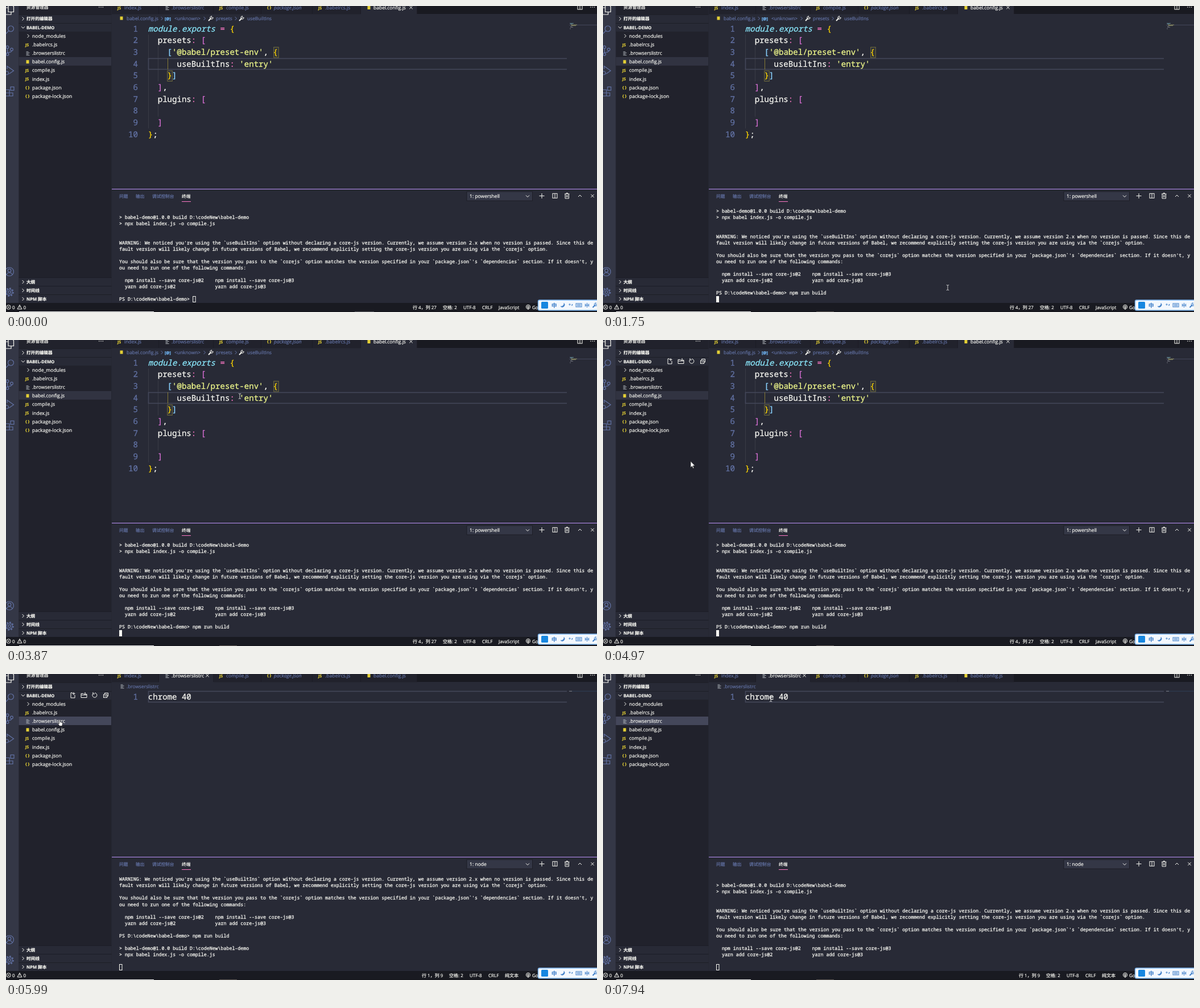
Animation of 1039 by 539 pixels, one loop 8 s. Source, as an HTML page:

```html
<!DOCTYPE html>
<html lang="zh">
<head>
<meta charset="utf-8">
<title>Code editor</title>
<style>
html, body { margin: 0; width: 100%; height: 100%; overflow: hidden; background: #282a36; }
svg { display: block; width: 100vw; height: 100vh; }
text { white-space: pre; text-rendering: geometricPrecision; stroke-width: .2px; font-family: "Open Sans", "Noto Sans CJK SC", "Noto Sans CJK", sans-serif; }
.mono { font-family: "Noto Sans Mono", monospace; stroke-width: .28px; }
</style>
</head>
<body>
<svg id="stage" viewBox="0 0 1039 539"></svg>
<script>
const LOOP = 8000;
const FG = '#f8f8f2', DIM = '#6272a4', BG = '#282a36', SIDE = '#21222c', DARK = '#191a21',
  LINE = '#44475a', PINK = '#ff79c6', JS = '#e3cf35', SOFT = '#313341';
const INK = { w: FG, c: '#8be9fd', p: PINK, y: '#f1fa8c', g: '#ffd700', o: '#da70d6', b: '#87cefa' };

// [time, x, y]
const PATH = [[70, 630, 548], [400, 618, 520], [750, 606, 496], [2460, 606, 496], [2700, 395, 195],
  [2930, 395, 195], [3150, 379, 130], [3400, 400, 76], [3700, 458, 92], [3780, 443, 101],
  [3870, 411, 99], [4260, 411, 98], [4600, 300, 185], [4850, 190, 224], [5050, 130, 215],
  [5260, 90, 120], [5370, 94, 66], [5460, 95, 86], [6080, 95, 86], [6530, 362, 62],
  [6900, 325, 55], [7390, 302, 42], [7460, 302, 42], [7650, 295, 44]];

const TREE = [['node_modules', 'dir'], ['.babelrcs.js', 'js'], ['.browserslistrc', 'txt'],
  ['babel.config.js', 'cfg'], ['compile.js', 'js'], ['index.js', 'js'],
  ['package.json', 'json'], ['package-lock.json', 'json']];

// [left edge, name, icon]
const TABS = [[186, 'index.js', 'js'], [269, '.browserslistrc', 'txt'], [365, 'compile.js', 'js'],
  [449, 'package.json', 'json'], [539, '.babelrcs.js', 'js'], [624, 'babel.config.js', 'cfg'], [723]];

// ink key and text alternate
const CONFIG = [
  ['c', 'module.exports', 'p', ' = ', 'g', '{'],
  ['w', '  presets', 'p', ': ', 'o', '['],
  ['b', '    [', 'y', "'@babel/preset-env'", 'w', ', ', 'g', '{'],
  ['w', '      useBuiltIns', 'p', ': ', 'y', "'entry'"],
  ['g', '    }', 'b', ']'],
  ['o', '  ]', 'w', ','],
  ['w', '  plugins', 'p', ': ', 'o', '['],
  [],
  ['o', '  ]'],
  ['g', '}', 'w', ';']];

const PROMPT = 'PS D:\\codeNew\\babel-demo> ', RUN = PROMPT + 'npm run build';
const BUILD = ['> babel-demo@1.0.0 build D:\\codeNew\\babel-demo', '> npx babel index.js -o compile.js', ''];
const WARN = ['',
  "WARNING: We noticed you're using the `useBuiltIns` option without declaring a core-js version. Currently, we assume version 2.x when no version is passed. Since this de",
  'fault version will likely change in future versions of Babel, we recommend explicitly setting the core-js version you are using via the `corejs` option.',
  '',
  "You should also be sure that the version you pass to the `corejs` option matches the version specified in your `package.json`'s `dependencies` section. If it doesn't, y",
  'ou need to run one of the following commands:',
  '',
  '  npm install --save core-js@2    npm install --save core-js@3',
  '  yarn add core-js@2              yarn add core-js@3',
  ''];

const esc = s => s.replace(/&/g, '&amp;').replace(/</g, '&lt;');
const paint = c => `fill="${c}" stroke="${c}"`;
const text = (x, y, s, color = FG, size = 8.55, more = '') =>
  `<text x="${x}" y="${y}" ${paint(color)} font-size="${size}" ${more}>${esc(s)}</text>`;
const rect = (x, y, w, h, fill, more = '') =>
  `<rect x="${x}" y="${y}" width="${w}" height="${h}" fill="${fill}" ${more}/>`;
const box = (x, y, w, h, color, sw = 1) => rect(x, y, w, h, 'none', `stroke="${color}" stroke-width="${sw}"`);
const path = (d, color = FG, w = 1, fill = 'none') =>
  `<path d="${d}" stroke="${color}" stroke-width="${w}" fill="${fill}"/>`;
const ring = (x, y, r, color, w = 1, more = '') =>
  `<circle cx="${x}" cy="${y}" r="${r}" fill="none" stroke="${color}" stroke-width="${w}" ${more}/>`;
const right = (x, y, c = FG, s = 3) => path(`M${x - s / 2} ${y - s}l${s} ${s}l${-s} ${s}`, c);
const down = (x, y, c = FG) => path(`M${x - 3} ${y - 1.5}l3 3l3-3`, c);
const cross = (x, y, s = 2.7) => path(`M${x - s} ${y - s}l${2 * s} ${2 * s}m0 ${-2 * s}l${-2 * s} ${2 * s}`);
const dots = (x, y) => [-3.3, 0, 3.3].map(d => rect(x + d - .6, y - .6, 1.3, 1.3, FG)).join('');
const split = (x, y) => box(x - 4, y - 4, 8, 8, FG) + path(`M${x} ${y - 4}v8`);
const wrench = (x, y, c) =>
  path(`M${x - 4} ${y + 4}l4.5-4.5`, c, 1.9) + path(`M${x + 4} ${y - 2}a2.7 2.7 0 1 1-2-2l-1.5 2l1.3 1.3z`, c, 1);

function icon(kind, x, y) {
  if (kind == 'js') return text(x - 4, y + 2.6, 'JS', JS, 7, 'font-weight="700"');
  if (kind == 'json') return text(x - 4, y + 2.4, '{ }', JS, 7, 'font-weight="700"');
  if (kind == 'cfg') return rect(x - 2.5, y - 3, 5, 6, JS);
  if (kind == 'dir') return right(x + 1, y);
  return path(`M${x - 2.5} ${y - 2.5}h4m-4 2h6m-6 2h4m-4 2h6`, '#b9c0c4', .9);
}

function activityBar() {
  const g = (d, w = 1.2) => path(d, DIM, w);
  return rect(0, 0, 22.5, 523, '#343746')
    + path('M4-3V10.5H13.5V1L10-3M4 3H-2V15H9V10.5', FG, 1.2)
    + ring(8.5, 40, 5, DIM, 1.2) + g('M5 43.7l-6 6')
    + ring(2.5, 72.5, 2.3, DIM, 1.2) + ring(2.5, 85, 2.3, DIM, 1.2) + ring(10, 76.5, 2.3, DIM, 1.2)
    + g('M2.5 75v7.6M10 79c0 3-5 2-7.5 3.5')
    + g('M2 111v-5l11.5 8l-8 5.5') + ring(1.5, 118, 3, DIM, 1.2)
    + g('M-1 147.5H6V158.5H-1M-1 153H12V158.5H6') + box(8, 142.5, 6, 6, DIM, 1.2)
    + ring(6, 468, 7.5, DIM, 1.2) + ring(6, 466, 2.8, DIM, 1.2) + g('M1 473.5c1-5 9-5 10 0')
    + ring(6, 504, 2.3, DIM, 1.2) + ring(6, 504, 5.2, DIM, 1.2)
    + ring(6, 504, 6.8, DIM, 2, 'stroke-dasharray="2.6 2.74"');
}

function section(y, name, open) {
  return rect(22.5, y - 7.5, 163, 15, BG) + rect(22.5, y - 7.7, 163, .7, DARK)
    + (open ? down(30, y) : right(30, y)) + text(36, y + 2.8, name, FG, 7.6, 'font-weight="700"');
}

function sidebar(opened, cur) {
  const over = cur.x > 22 && cur.x < 185 && cur.y < 478;
  const hover = over ? Math.floor((cur.y - 45.2) / 15.2) : -1;
  let s = rect(22.5, 0, 163, 523, SIDE) + text(36, 5.2, '资源管理器', FG, 7.7) + dots(167, 2)
    + section(22.5, '打开的编辑器') + section(37.7, 'BABEL-DEMO', true);
  TREE.forEach(([name, kind], i) => {
    const y = 52.8 + i * 15.17;
    const fill = opened && i == 2 ? LINE : i == hover || (!opened && i == 3) ? SOFT : '';
    if (fill) s += rect(22.5, Math.round(y - 8), 162.5, 15, fill);
    s += icon(kind, 38, y) + text(46, y + 3, name);
  });
  if (over) s += path('M117 33h-3v9h7v-5M119 32v5M116.5 34.5h5')
    + path('M132 41.5v-7h4l1 1h5v6zM132 37h10M139 32v4')
    + path('M153 34.5a4 4 0 1 0 3-1.2M153 32v3h3')
    + box(171.5, 36, 6, 5.5, FG) + path('M173.5 36v-2.5h6v5.5h-2M173 38.7h3');
  return s + section(486, '大纲') + section(501, '时间线') + section(516, 'NPM 脚本');
}

function tabs(active) {
  let s = rect(186, 0, 853, 14, DARK);
  TABS.slice(0, -1).forEach(([x, name, kind], i) => {
    const on = i == active, end = TABS[i + 1][0];
    s += rect(x, 0, end - x - .6, 14.5, on ? BG : SIDE) + icon(kind, x + 14, 3)
      + text(x + 22, 6, name, on ? FG : DIM, 8.5, i == 3 ? 'font-style="italic"' : '');
    if (on) s += cross(end - 11, 2.5);
  });
  return s + split(1009, 2) + dots(1031, 2);
}

const code = (i, parts) => {
  const y = 44.8 + i * 20.67;
  let spans = '';
  for (let k = 0; k < parts.length; k += 2) {
    const italic = parts[k] == 'c' ? ' font-style="italic"' : '';
    spans += `<tspan ${paint(INK[parts[k]])}${italic}>${esc(parts[k + 1])}</tspan>`;
  }
  return text(232, y, String(i + 1), DIM, 14.08, 'class="mono" text-anchor="end"')
    + `<text class="mono" x="249.8" y="${y}" font-size="14.08">${spans}</text>`;
};
const guide = (x, from, to) => rect(x, 29.5 + 20.67 * (from - 1), .8, 20.67 * (to - from + 1), '#3e404b');
const activeLine = y => path(`M986 ${y}H250.5v19H986`, LINE, 1.6);

function configFile() {
  const crumb = (x, s) => text(x, 25, s, DIM, 8.4);
  const match = (x, y) => rect(x, y, 8.5, 18.5, '#30323a', 'stroke="#77723f" stroke-width=".9"');
  return icon('cfg', 203, 21.5) + crumb(212, 'babel.config.js') + right(274, 22, DIM)
    + text(279, 24.5, '[@]', '#75beff', 7, 'font-weight="700"') + crumb(296, '<unknown>') + right(349, 22, DIM)
    + wrench(360, 22, FG) + crumb(369, 'presets') + right(404, 22, DIM)
    + wrench(414, 22, FG) + crumb(424, 'useBuiltIns')
    + guide(250, 2, 9) + guide(267, 3, 5) + guide(267, 8, 8)
    + activeLine(92.5) + rect(284, 92, .9, 20, '#8f8338')
    + match(470.7, 72.5) + match(283.8, 114) + CONFIG.map((p, i) => code(i, p)).join('')
    + rect(990, 33, 49, 1, LINE)
    + path('M991 30.5h7M992 31.8h4', '#6f9aa5', .8) + path('M993 33.2h11M994 34.6h8', '#a3a46c', .8)
    + path('M992 36h3M992 37.4h5M991 40h2', '#7d7f88', .8);
}

function listFile() {
  return icon('txt', 204, 21.5) + text(212, 25, '.browserslistrc', DIM, 8.4)
    + activeLine(30.5) + code(0, ['w', 'chrome 40'])
    + rect(990, 29.8, 49, 1, '#2f3e55') + rect(990, 29.8, 5, 1, '#7d7f88');
}

function terminal(t) {
  const hollow = t < 680 || t >= 5830;
  const name = t < 5910 ? '1: powershell' : '1: node';
  // the last row of each list holds the caret
  const rows = t < 1370 ? [...BUILD, ...WARN, PROMPT]
    : t < 1750 ? [...BUILD, ...WARN, RUN]
    : t < 5910 ? [...BUILD, ...WARN, RUN, '']
    : t < 7700 ? [...WARN, RUN, '', ...BUILD, '']
    : [...BUILD, ...WARN, ''];
  let s = rect(186, 322, 853, 1, '#bd93f9');
  [[199, '问题'], [228, '输出'], [257, '调试控制台'], [309, '终端']].forEach(([x, label]) =>
    s += text(x, 337.8, label, x == 309 ? FG : DIM, 7.7));
  s += rect(309, 344, 16, 1, PINK)
    + rect(810, 327, 115.5, 16, '#343746', `stroke="${DARK}" stroke-width=".8"`)
    + text(815, 338.2, name) + down(917, 335)
    + path('M937.5 334.5h9M942 330v9') + split(965, 334.3)
    + path('M982 331h8.5M985 331v-1.5h2.5V331M983 331v8h6.5v-8M985.2 333v4M987.3 333v4')
    + path('M1006 336l3-3l3 3') + cross(1031, 334.5);
  rows.forEach((row, i) => {
    if (row) s += text(199, 519 - (rows.length - 1 - i) * 11.05, row, FG, 8.278, 'class="mono"');
  });
  const x = 199 + rows.at(-1).length * 4.967;
  return s + (hollow ? box(x + .5, 511.5, 4.5, 10, FG) : rect(x, 511, 5, 11, FG));
}

function statusBar(t, opened) {
  const label = (x, s) => text(x, 533.5, s, FG, 8);
  const items = opened
    ? [[731, '行 1，列 9'], [779, '空格: 2'], [815, 'UTF-8'], [848, 'CRLF'], [877, '纯文本']]
    : [[715, '行 4，列 27'], [768, '空格: 2'], [804, 'UTF-8'], [837, 'CRLF'], [866, 'JavaScript']];
  const blue = '#3f7fc8';
  return rect(0, 523, 1039, 16, DARK)
    + ring(4.5, 530.5, 3.7, FG) + cross(4.5, 530.5, 1.6) + label(11, '0')
    + path('M24 526.5l4 7.3h-8zM24 529v2.4') + label(30.5, '0')
    + items.map(([x, s]) => label(x, s)).join('')
    + ring(918, 530, 3.6, FG) + ring(918, 530, 1.5, FG) + path('M918 530v5') + label(925, 'Go Live')
    + rect(0, 538, 1039, 1, '#15161b') + rect(23, 538, 237, 1, '#f2f2f2')
    + (t < 70 ? rect(613, 538, 34, 1, '#55565c') : rect(375, 538, 31, 1, '#5d5753'))
    + rect(935.5, 518, 112, 18, '#f3f8fe', 'rx="2.5" stroke="#79b4ee" stroke-width="1.4"')
    + rect(941, 521, 12, 12, '#1787e0', 'rx="1.5"')
    + text(959, 530.8, '中', blue, 9.5, 'font-weight="700"')
    + path('M981 523.5a4 4 0 1 1-6 5.5a5 5 0 0 0 6-5.5z', blue, .6, blue)
    + ring(991, 525.8, 1.1, blue) + path('M995.5 525v1.5l-1 1.5', blue, 1.3)
    + box(1002, 524, 10, 6, blue) + path('M1003.5 526h7M1003.5 528h7', blue)
    + path('M1018 527h7M1021.5 523v8M1018.5 524.5v5M1024.5 524.5v5', blue, 1.2)
    + wrench(1035.5, 527, blue);
}

function cursorAt(t) {
  if (t < PATH[0][0]) return { x: 630, y: 560 };
  const i = PATH.findIndex(p => p[0] > t);
  if (i < 0) return { x: PATH.at(-1)[1], y: PATH.at(-1)[2] };
  const [t0, x0, y0] = PATH[i - 1], [t1, x1, y1] = PATH[i], k = (t - t0) / (t1 - t0);
  return { x: x0 + (x1 - x0) * k, y: y0 + (y1 - y0) * k };
}

function pointer({ x, y }) {
  const shape = x > 186
    ? path('M-2.2-4.6Q0-4.6 0-3.4Q0-4.6 2.2-4.6M0-3.6V3.6M-2.2 4.6Q0 4.6 0 3.4Q0 4.6 2.2 4.6', '#dcdcdc', .9)
    : y < 167
      ? path('M-1.6-4.5q1-1.2 2 0v3.2l3.2.8q1 .4.9 1.5l-.9 4.5h-4.5l-2.8-4.2q.3-1.4 2.1.2z', '#222', .7, '#fff')
      : path('M0-5v11l2.6-2.4l1.8 4l1.6-.7l-1.8-3.9h3.6z', '#222', .7, '#fff');
  return `<g transform="translate(${x.toFixed(2)} ${y.toFixed(2)})">${shape}</g>`;
}

function scene(t) {
  const opened = t >= 5830, cur = cursorAt(t);
  const tip = t >= 5590 && t < 5750
    ? rect(99.5, 90.5, 172.5, 16.5, '#fff', 'stroke="#767676" stroke-width=".7"')
      + text(105, 101.5, 'D:\\codeNew\\babel-demo\\.browserslistrc', '#333', 8.45)
    : '';
  return rect(0, 0, 1039, 539, BG) + activityBar() + sidebar(opened, cur) + tabs(opened ? 1 : 5)
    + (opened ? listFile() : configFile()) + terminal(t) + statusBar(t, opened) + tip + pointer(cur);
}

const stage = document.getElementById('stage');
let start, last;
function tick(now) {
  start ??= now;
  const next = scene((now - start) % LOOP);
  if (next !== last) stage.innerHTML = last = next;
  requestAnimationFrame(tick);
}
requestAnimationFrame(tick);
</script>
</body>
</html>
```
